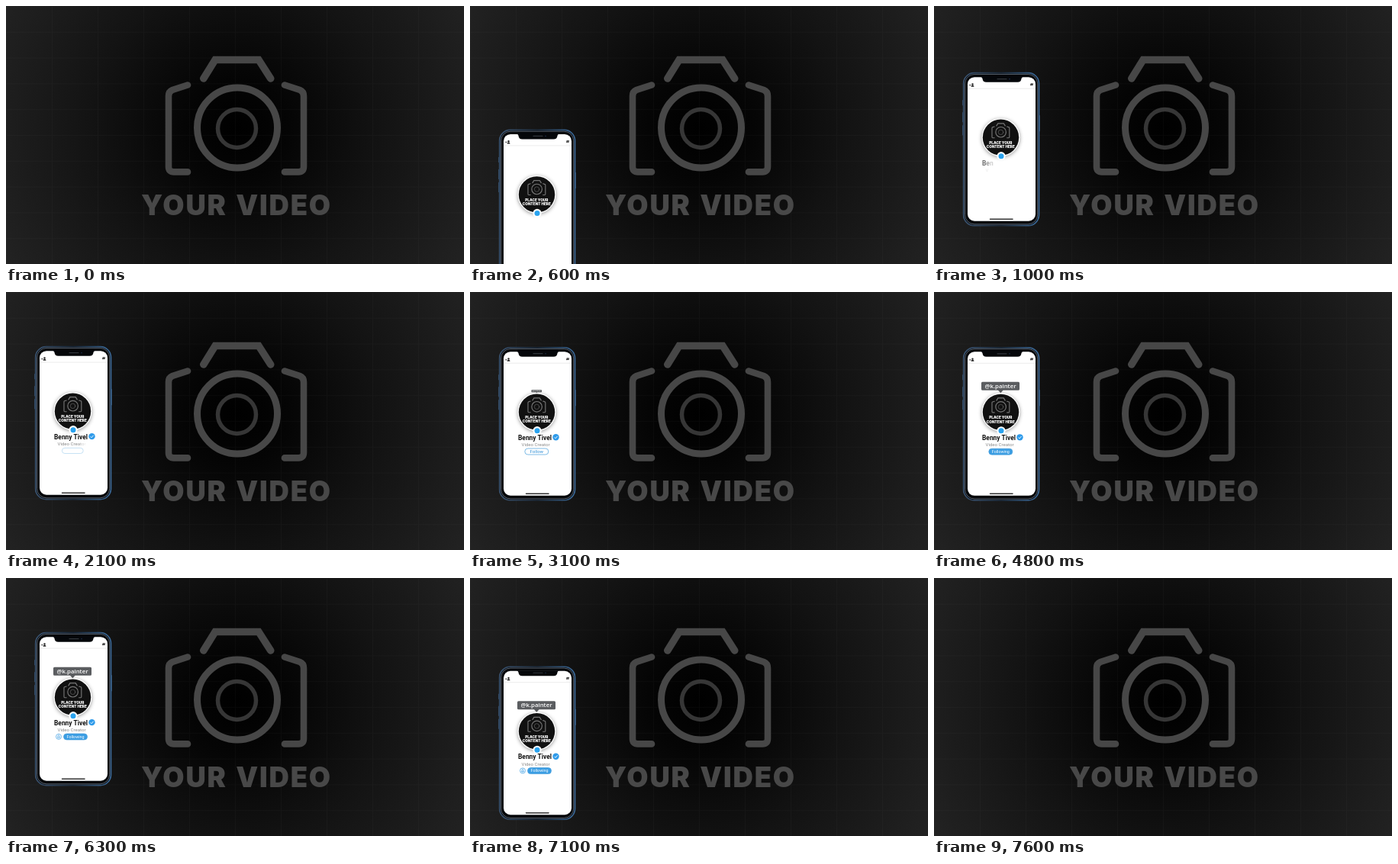
Recreate the animation shown at these times as an HTML page. Size 600 by 338 pixels, loop 7900 ms.

```html
<!DOCTYPE html>
<html lang="en">
<head>
<meta charset="utf-8">
<title>Profile phone overlay</title>
<style>
  html, body { margin: 0; width: 100%; height: 100%; overflow: hidden; background: #111; }
  svg { display: block; width: 100vw; height: 100vh; }
  .heavy { font-family: Inter, sans-serif; font-weight: 900; text-anchor: middle; }
  .title { font-size: 36.5px; letter-spacing: 1.8px; word-spacing: 2.5px; }
  .ui { font-family: Roboto, sans-serif; }
  .mid { text-anchor: middle; }
  #halo { filter: drop-shadow(0 1px 2.5px rgba(0, 0, 0, .4)); }
</style>
</head>
<body>
<svg viewBox="0 0 600 338" preserveAspectRatio="none">
  <defs>
    <radialGradient id="vignette" gradientUnits="userSpaceOnUse" cx="302" cy="160" r="345">
      <stop offset="0" stop-color="#000"/>
      <stop offset=".2" stop-color="#050505"/>
      <stop offset=".55" stop-color="#131313"/>
      <stop offset="1" stop-color="#222"/>
    </radialGradient>
    <linearGradient id="metal">
      <stop offset="0" stop-color="#3c5674"/>
      <stop offset=".5" stop-color="#1c2a3a"/>
      <stop offset="1" stop-color="#3d6c9c"/>
    </linearGradient>
    <pattern id="grid" width="60" height="33.8" patternUnits="userSpaceOnUse">
      <path d="M0 .5H60M.5 0V33.8" stroke="#fff" stroke-opacity=".025"/>
    </pattern>
    <g id="camera" fill="none" stroke-linecap="round" stroke-linejoin="miter">
      <path stroke-width="9.600" d="M258.800 95 274 70.500H331L346.700 95"/>
      <path stroke-width="8.600" d="M238 103.500 218 110Q213 112 213 118V210.400Q213 217.400 220 217.400H238M365 103.500 385 110Q390 112 390 118V210.400Q390 217.400 383 217.400H365"/>
      <circle cx="303" cy="159.500" r="52.500" stroke-width="9"/>
      <circle cx="302.500" cy="160.500" r="25" stroke-width="5.500" stroke-opacity=".76"/>
    </g>
  </defs>

  <rect width="600" height="338" fill="url(#vignette)"/>
  <rect width="600" height="338" fill="url(#grid)"/>
  <use href="#camera" stroke="#474747"/>
  <text class="heavy title" x="302" y="274.300" fill="#484848">YOUR VIDEO</text>

  <g id="phone">
    <path d="M38 108v7M38 124v13M38 141v13M138 128v21" stroke="#35506e" stroke-width="1.500"/>
    <rect x="38.700" y="72.500" width="98.800" height="200" rx="14" fill="#05070a" stroke="url(#metal)" stroke-width="1.600"/>
    <rect x="40.500" y="74.300" width="95.200" height="196.400" rx="12.500" fill="none" stroke="#8d9bab" stroke-width=".6"/>
    <rect x="44" y="78" width="89" height="188.500" rx="9" fill="#fff"/>
    <path d="M61 77.500Q63.500 78 63.500 80Q64 84.500 68.500 84.500H109.500Q114 84.500 114.500 80Q114.500 78 117 77.500Z" fill="#05070a"/>
    <path d="M83 80.500H95" stroke="#30343a" stroke-width="1.200" stroke-linecap="round"/>
    <circle cx="99" cy="80.500" r=".8" fill="#1c2c48"/>
    <path d="M44 93H133" stroke="#e4e4e4" stroke-width=".7"/>
    <path d="M46.300 88.500h2M47.300 87.500v2" stroke="#222" stroke-width=".6"/>
    <path d="M48.500 90.500q0-2 2-2t2 2z" fill="#222"/>
    <circle cx="50.500" cy="87.300" r="1.200" fill="#222"/>
    <path d="M126.600 89l1-3M128.300 89l1-3M126.300 87h3.700M126 88.300h3.700" stroke="#222" stroke-width=".8"/>
    <path d="M73.500 264H103" stroke="#333" stroke-width="1.500" stroke-linecap="round"/>

    <g id="tip">
      <path d="M63.500 117.500H110.500Q112 117.500 112 119V127Q112 128.500 110.500 128.500H90.500L87.300 132 84 128.500H63.500Q62 128.500 62 127V119Q62 117.500 63.500 117.500Z" fill="#5b5d60"/>
      <text x="87" y="125.500" class="mid" font-family="'Open Sans', sans-serif" font-weight="600" font-size="7.800" fill="#fff">@k.painter</text>
    </g>

    <circle id="halo" cx="87.500" cy="157" r="25" fill="#fff"/>
    <circle cx="87.500" cy="157" r="23.700" fill="#111"/>
    <use href="#camera" transform="translate(48.500 129.500) scale(.129)" stroke="#777"/>
    <g class="heavy" font-size="4.700" fill="#fff">
      <text x="87.300" y="166">PLACE YOUR</text>
      <text x="87.300" y="171.300">CONTENT HERE</text>
    </g>
    <circle cx="88" cy="181.500" r="5.600" fill="#fff"/>
    <circle cx="88" cy="181.500" r="3.500" fill="#2aa3ef"/>

    <text id="name" class="ui" x="63" y="193.500" font-size="8.400" font-weight="700" fill="#111"></text>
    <text id="role" class="ui" x="67.500" y="202" font-size="6.100" fill="#8c8c8c"></text>
    <g id="badge">
      <circle cx="112.500" cy="190" r="4.200" fill="#2f9bea"/>
      <path d="M110.600 190.200l1.400 1.400 2.600-3" fill="none" stroke="#fff" stroke-width=".9"/>
    </g>

    <g id="bell" fill="none" stroke="#3a9de3" stroke-width=".7">
      <circle cx="69" cy="208.700" r="3.500"/>
      <path d="M67.200 209.800q.8-.6.800-1.600 0-1.400 1-1.400t1 1.400q0 1 .8 1.600zM68.600 210.700h.8"/>
    </g>
    <g id="button">
      <rect id="pill" x="71.800" y="204.800" width="31" height="8" rx="4" stroke="#4a9fdc" stroke-width=".7" fill="#3a9de3"/>
      <text id="follow" class="ui mid" x="87.300" y="210.900" font-size="6" fill="#2f8fd6">Follow</text>
      <text id="following" class="ui mid" x="87.300" y="210.700" font-size="5.400" fill="#fff">Following</text>
    </g>
  </g>
</svg>
<script>
  const LOOP = 7900, STEP = 100;
  const $ = id => document.getElementById(id);
  const progress = (t, from, to) => Math.min(1, Math.max(0, (t - from) / (to - from)));
  const easeOut = p => 1 - (1 - p) ** 3;
  const fade = (id, value) => $(id).setAttribute("opacity", value);
  const scaleAt = (id, x, y, s, dx = 0) =>
    $(id).setAttribute("transform", `translate(${x + dx} ${y}) scale(${s}) translate(${-x} ${-y})`);

  function splitLetters(id, text) {
    return [...text].map(char => {
      const span = document.createElementNS("http://www.w3.org/2000/svg", "tspan");
      span.textContent = char === " " ? "\u00a0" : char;
      return $(id).appendChild(span);
    });
  }
  const nameLetters = splitLetters("name", "Benny Tivel");
  const roleLetters = splitLetters("role", "Video Creator");

  const reveal = (letters, t, start, gap) => letters.forEach((letter, i) =>
    letter.setAttribute("fill-opacity", progress(t, start + i * gap, start + i * gap + 400)));

  function draw(t) {
    const enter = 270 * (1 - easeOut(progress(t, 200, 1500)));
    const leave = 270 * progress(t, 6500, 7600) ** 3;
    const drift = -0.9 * Math.cos((t - 1900) / 4200 * 2 * Math.PI);
    $("phone").setAttribute("transform", `translate(0 ${enter + leave + drift})`);
    $("phone").setAttribute("visibility", t >= 300 && t < 7600 ? "visible" : "hidden");

    reveal(nameLetters, t, 760, 80);
    reveal(roleLetters, t, 920, 92);
    scaleAt("badge", 112.5, 190, easeOut(progress(t, 1500, 2000)));
    scaleAt("tip", 87.3, 132, easeOut(progress(t, 3000, 4000)));

    const grow = easeOut(progress(t, 1900, 2500));
    const press = 0.1 * Math.sin(Math.PI * progress(t, 4100, 4500));
    const slide = easeOut(progress(t, 5800, 6300));
    const active = progress(t, 4200, 4500);
    scaleAt("button", 87.3, 208.8, 0.65 + 0.35 * grow - press, 3.7 * slide);
    fade("button", progress(t, 1900, 2300));
    $("pill").setAttribute("fill-opacity", active);
    fade("follow", progress(t, 2200, 2600) * (1 - active));
    fade("following", active);
    scaleAt("bell", 69, 208.7, slide);
  }

  function tick() {
    const t = performance.now() % LOOP;
    draw(Math.floor(t / STEP) * STEP);
    requestAnimationFrame(tick);
  }
  tick();
</script>
</body>
</html>
```
